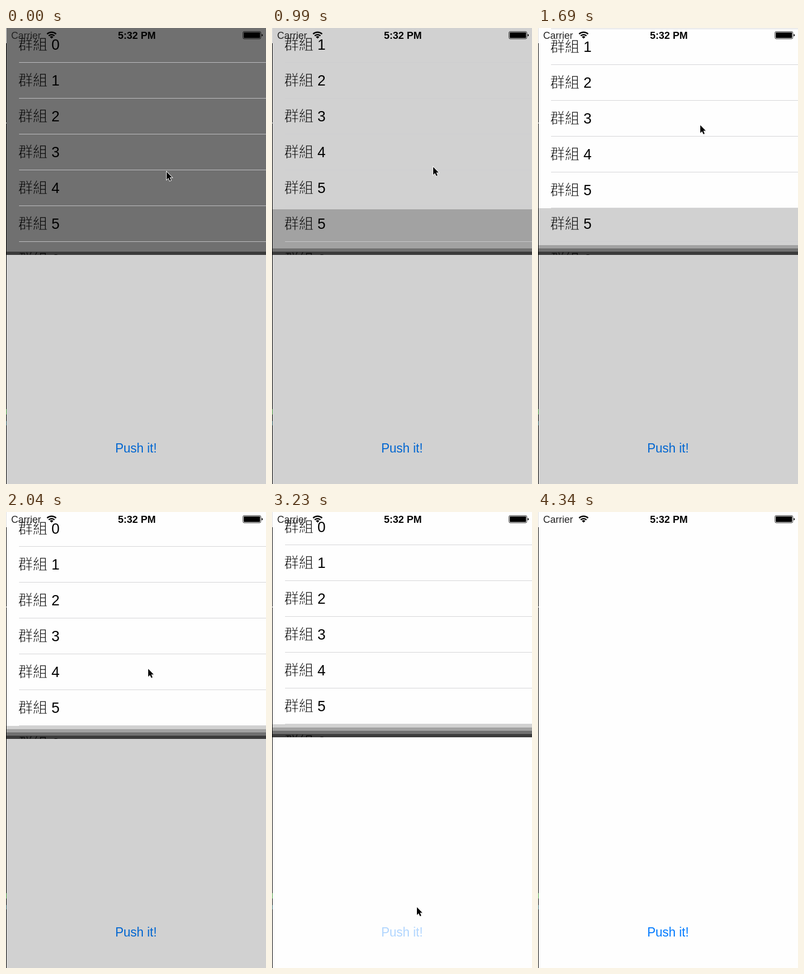
Write an HTML page that moves like this. It is 479 px wide and 840 px high and loops after 4.44 s.

```html
<!DOCTYPE html>
<html lang="zh-Hant">
<head>
<meta charset="utf-8">
<title>Stacked panels</title>
<style>
  html, body { margin: 0; width: 100%; height: 100%; overflow: hidden; background: #fefefe; }
  svg { display: block; }
  text { font-family: "Liberation Sans", Arial, sans-serif; }
  .row { font: 300 26.9px "Liberation Sans", "Noto Sans CJK TC", "Noto Sans CJK", sans-serif; }
  .thin { stroke-width: .75px; }
  .status { font-size: 18px; }
  .clock { font-size: 18.4px; font-weight: bold; }
  .push { font-size: 23px; }
</style>
</head>
<body>
<svg id="stage" width="479" height="840" viewBox="0 0 479 840">
  <rect id="page" width="479" height="840"/>
  <text id="push" class="push" x="239.5" y="782" text-anchor="middle">Push it!</text>
  <g id="panels"></g>

  <text class="status" x="9.5" y="20" fill="#222">Carrier</text>
  <g fill="none" stroke="#000" stroke-width="2.4">
    <path d="M75.7 11.2A11.8 11.8 0 0 1 92.3 11.2"/>
    <path d="M78.7 14.4A7.5 7.5 0 0 1 89.3 14.4"/>
  </g>
  <path d="M84 19.6L80.8 16.4A4.5 4.5 0 0 1 87.2 16.4Z"/>
  <text class="clock" x="241" y="20" text-anchor="middle">5:32 PM</text>
  <rect x="436.5" y="6.5" width="33" height="13.5" rx="2.5" fill="none" stroke="#000" stroke-width=".8"/>
  <rect x="438" y="8" width="30" height="10.5" rx="1"/>
  <path d="M471 11q2 .4 2 2.3t-2 2.3z"/>

  <g id="edge">
    <rect width="1" height="840"/>
    <rect width="1" height="28" fill="#dedede"/>
    <rect y="174" width="1" height="2" fill="#aaa"/>
    <rect y="702" width="1" height="10" fill="#3f9a35"/>
    <rect y="724" width="1" height="8" fill="#28606a"/>
  </g>

  <g id="cursor">
    <path d="M0 0V14.2L3.2 11.2L5.6 16.6L8 15.6L5.6 10.3H10Z" transform="translate(.5 1.5)" opacity=".2"/>
    <path d="M0 0V14.2L3.2 11.2L5.6 16.6L8 15.6L5.6 10.3H10Z" stroke="#fff" paint-order="stroke" stroke-width="1.8"/>
  </g>
</svg>
<script>
const LOOP = 4440;
const EXIT = 3230;
const byId = id => document.getElementById(id);

// Bursts of movement: start, end, number of pictures
const bursts = [
  [180, 570, 7], [870, 1330, 9], [1570, 2040, 9], [2280, 2760, 9],
  [2820, 2990, 4], [EXIT, 3490, 5], [3700, 4120, 7]
];

const panels = [
  { height: 418, shade: '#3b3b3b', start: -1000 },
  { height: 412, shade: '#707070', start: -1000 },
  { height: 406, shade: '#a2a2a2', start: 150 },
  { height: 400, shade: '#d1d1d1', start: 840 },
  { height: 394, shade: '#fefefe', start: 1540 }
];

const easeIn = p => 1 - Math.cos(p * Math.PI / 2);
const easeOut = p => Math.sin(p * Math.PI / 2);
const easeBoth = p => (1 - Math.cos(p * Math.PI)) / 2;
const clamp = p => Math.min(1, Math.max(0, p));

// Pointer tip: time, x, y, easing towards this point
const pointer = [
  [0, 296, 265], [900, 296, 265], [1330, 303, 168, easeBoth],
  [1600, 303, 168], [2040, 262, 289, easeBoth],
  [2220, 262, 289], [2520, 315, 406, easeIn], [2760, 265, 718, easeOut],
  [2820, 269, 731], [2880, 270, 738], [2990, 267, 728, easeBoth],
  [3650, 267, 728], [4120, 431, 845, easeBoth], [LOOP, 431, 845]
];

// A stroke in the panel's own shade slims the heavy ideographs
function buildPanel({ height, shade }) {
  let rows = '';
  for (let i = 0; i < 7; i++) {
    rows += `<text class="row" x="22.5" y="${40 + 66 * i}"><tspan class="thin" stroke="${shade}">群組</tspan> ${i}</text>` +
      `<rect x="24" y="${63 + 66 * i}" width="455" height="1" fill="#ceced0" opacity=".85"/>`;
  }
  return `<svg width="479" height="${height}"><rect width="479" height="${height}" fill="${shade}"/>${rows}</svg>`;
}

byId('panels').innerHTML = panels.map(buildPanel).join('');
panels.forEach((panel, i) => panel.node = byId('panels').children[i]);

// Holds the time between the pictures of a burst
function snap(t) {
  let held = 0;
  for (const [start, end, count] of bursts) {
    if (t < start) break;
    const step = (end - start) / (count - 1);
    held = Math.min(end, start + Math.floor((t - start) / step + 1e-4) * step);
  }
  return held;
}

// Share of the way still to go for a critically damped spring
function springLeft(ms) {
  const x = Math.max(0, ms) * 0.0224;
  return Math.exp(-x) * (1 + x);
}

function pointerAt(t) {
  const i = pointer.findIndex(key => key[0] > t);
  const [t0, x0, y0] = pointer[i - 1];
  const [t1, x1, y1, ease = p => p] = pointer[i];
  const p = ease((t - t0) / (t1 - t0));
  return [x0 + (x1 - x0) * p, y0 + (y1 - y0) * p].map(Math.round);
}

function render(now) {
  const t = snap(now % LOOP);
  const open = t < EXIT;
  const lift = 420 * easeBoth(clamp((t - EXIT + 15) / 265));

  for (const { node, height, start } of panels) {
    node.setAttribute('y', Math.round(-height * springLeft(t - start) - lift));
  }
  byId('page').setAttribute('fill', open ? '#d1d1d1' : '#fefefe');
  byId('push').setAttribute('fill', open ? '#0066d1' : '#007aff');
  byId('push').setAttribute('opacity', open ? 1 : 0.3 + 0.7 * clamp((t - EXIT) / 260));
  byId('cursor').setAttribute('transform', `translate(${pointerAt(t)})`);
}

const origin = performance.now();
function tick() {
  render(performance.now() - origin);
  requestAnimationFrame(tick);
}
tick();
</script>
</body>
</html>
```
